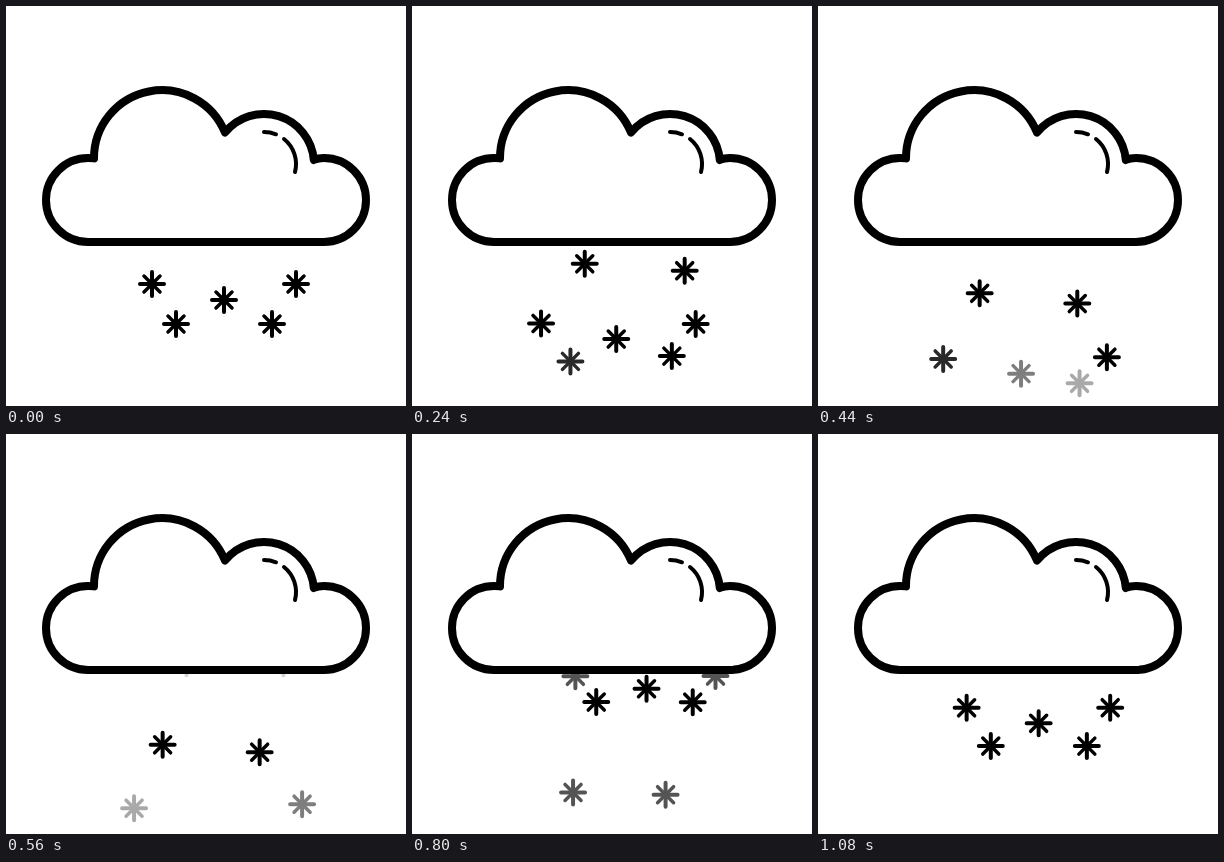
Write an HTML page that moves like this. It is 400 by 400 pixels and loops after 1120 ms.

```html
<!DOCTYPE html>
<html lang="en">
<head>
<meta charset="utf-8">
<title>Snow cloud</title>
<style>
  html, body { margin: 0; width: 100%; height: 100%; overflow: hidden; background: #fff; }
  svg { display: block; width: 100%; height: 100%; }
  svg { fill: none; stroke: #000; stroke-width: 4; stroke-linecap: round; stroke-linejoin: round; }
  .cloud { fill: #fff; stroke-width: 8; }
  .cross { stroke-width: 3.5; }
</style>
</head>
<body>
<svg viewBox="0 0 400 400">
  <g id="snow"></g>
  <path class="cloud" d="M88 152.4A42 42 0 0 0 82 152A42 42 0 0 0 82 236H318A42 42 0 0 0 318 152Q312 152 307.8 154A50 50 0 0 0 219 126.6A68 68 0 0 0 88 152.4Z"/>
  <path d="M258 126A32 32 0 0 1 270 128.3M278 133A32 32 0 0 1 289 166"/>
</svg>
<script>
const STEP = 40, STEPS = 28, FADE = 6;
const TOP = 223, BOTTOM = 388, BEND = 0.0043;
const STAR = '<path d="M0-12V12M-12 0H12"/><path class="cross" d="M-8-8L8 8M-8 8L8-8"/>';

// Every flake falls from TOP to BOTTOM through (x, y), where its curve turns over.
// start, turn and end count steps; lean is the sideways slope before and after the turn.
const flakes = [
  { start: 16, turn: 28, end: 44, x: 146, y: 278, lean: [0.64, 0.6] },
  { start: 13, turn: 28, end: 39, x: 170, y: 318, lean: [0.5, 0.47] },
  { start: 14, turn: 28, end: 42, x: 218, y: 294, lean: [0.59, 0.52] },
  { start: 13, turn: 28, end: 41, x: 266, y: 318, lean: [0.51, 0.33] },
  { start: 16, turn: 28, end: 45, x: 290, y: 278, lean: [0.53, 0.33] },
  { start: 0, turn: 10, end: 24, x: 164.3, y: 279.7, lean: [0.48, 0.38] },
  { start: 0, turn: 8, end: 24, x: 268, y: 278, lean: [0.41, 0.53] }
];

const snow = document.getElementById('snow');
const make = tag => document.createElementNS('http://www.w3.org/2000/svg', tag);

// Parabola from the turning point to the given height
function makeLeg({ x, y }, height, lean) {
  const dy = height - y;
  const path = make('path');
  const endX = x - lean * dy + BEND * dy * Math.abs(dy);
  path.setAttribute('d', `M${x} ${y}Q${x - lean * dy / 2} ${y + dy / 2} ${endX} ${height}`);
  return { path, length: path.getTotalLength() };
}

for (const flake of flakes) {
  flake.before = makeLeg(flake, TOP, flake.lean[0]);
  flake.after = makeLeg(flake, BOTTOM, flake.lean[1]);
  flake.el = make('g');
  flake.el.innerHTML = STAR;
  snow.append(flake.el);
}

// Steady speed along each leg
function place({ start, turn, end, before, after }, t) {
  const leg = t < turn ? before : after;
  const part = t < turn ? (turn - t) / (turn - start) : (t - turn) / (end - turn);
  return leg.path.getPointAtLength(part * leg.length);
}

function draw(ms) {
  const step = Math.floor(ms / STEP) % STEPS;
  for (const flake of flakes) {
    const t = step <= flake.start ? step + STEPS : step;
    const alpha = Math.max(0, Math.min(1, (t - flake.start) / FADE, (flake.end - t) / FADE));
    flake.el.setAttribute('opacity', alpha);
    if (!alpha) continue;
    const { x, y } = place(flake, t);
    flake.el.setAttribute('transform', `translate(${x} ${y})`);
  }
}

const begin = performance.now();
function tick() {
  draw(performance.now() - begin);
  requestAnimationFrame(tick);
}
tick();
</script>
</body>
</html>
```
